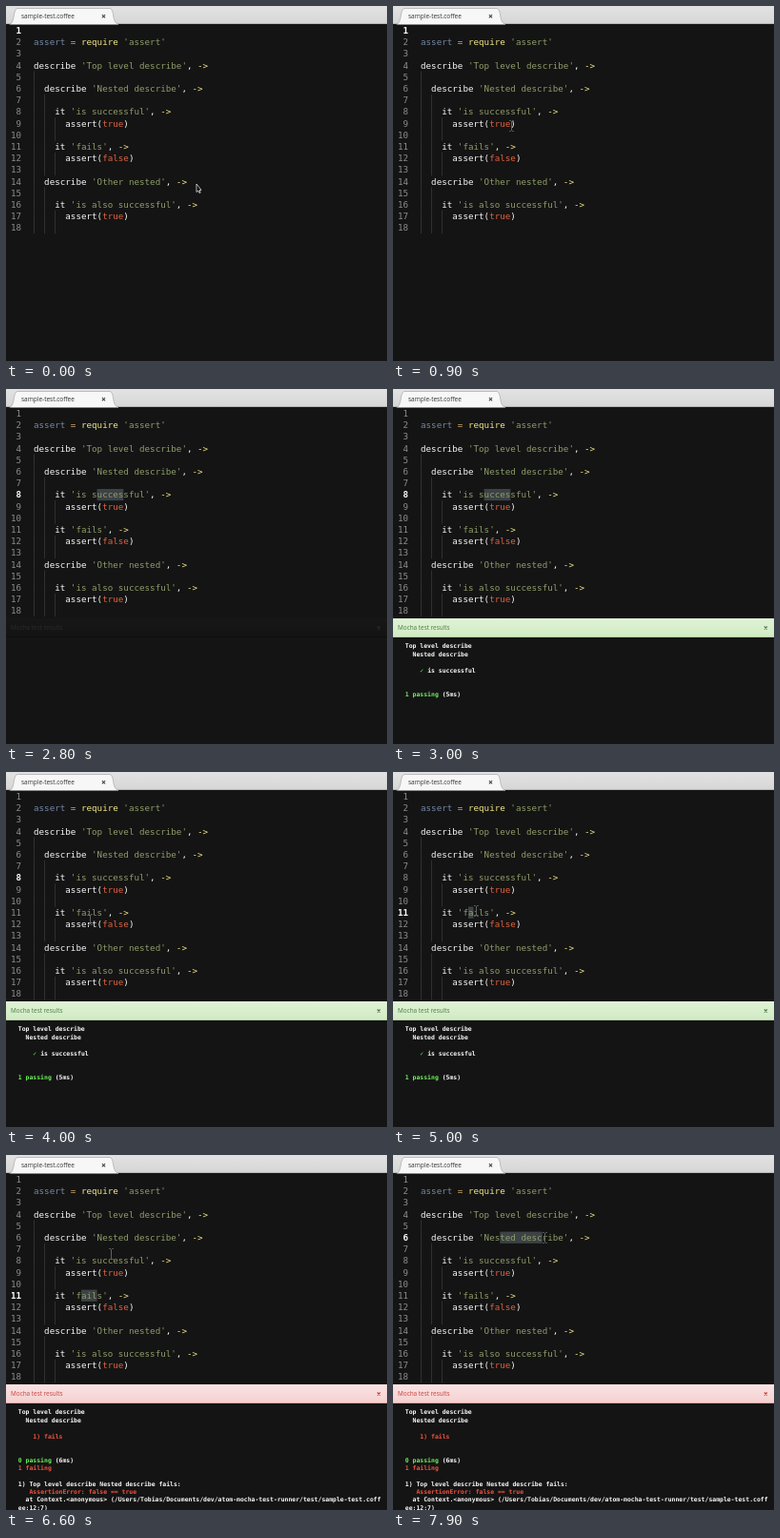
Recreate the animation shown at these times as an HTML page with a canvas. Size 400 px wide and 373 px high, loop 8000 ms.

```html
<!DOCTYPE html>
<html lang="en">
<head>
<meta charset="utf-8">
<title>Mocha test runner</title>
<style>
  html, body { margin: 0; width: 100%; height: 100%; overflow: hidden; background: #141414; }
  canvas { display: block; }
</style>
</head>
<body>
<canvas id="stage" width="400" height="373"></canvas>
<script>
const ctx = document.getElementById('stage').getContext('2d');
const LOOP = 8000, STEP = 100;
const CODE_X = 29, CHAR = 5.55, LINE = 12.2, FIRST = 25.7;
const MONO = '"DejaVu Sans Mono", monospace';
const CODE_FONT = '9.22px ' + MONO;
const OUT_FONT = 'bold 6.46px ' + MONO;
const UI = '"Open Sans", sans-serif';

const C = {
  bg: '#141414', w: '#f8f8f8', s: '#8f9d6a', y: '#f3e888', b: '#7587a6',
  o: '#cda869', r: '#e0623f', green: '#6df05c', red: '#f0523e'
};

// Each line: indent level, then [colour, text] runs
const describe = (level, name) => [level, ['w', 'describe '], ['s', `'${name}'`], ['w', ', '], ['y', '->']];
const it = name => [2, ['w', 'it '], ['s', `'${name}'`], ['w', ', '], ['y', '->']];
const check = value => [3, ['w', 'assert('], ['r', value], ['w', ')']];
const code = [
  null,
  [0, ['b', 'assert'], ['o', ' = '], ['y', 'require '], ['s', "'assert'"]],
  null,
  describe(0, 'Top level describe'),
  null,
  describe(1, 'Nested describe'),
  null,
  it('is successful'),
  check('true'),
  null,
  it('fails'),
  check('false'),
  null,
  describe(1, 'Other nested'),
  null,
  it('is also successful'),
  check('true'),
  null
];

// Each row: row number, column, runs
const head = [
  [0, 0, ['w', 'Top level describe']],
  [1, 2, ['w', 'Nested describe']]
];
const passOut = [
  ...head,
  [3, 4, ['green', '✓ '], ['w', 'is successful']],
  [6, 0, ['green', '1 passing '], ['w', '(5ms)']]
];
const failOut = [
  ...head,
  [3, 4, ['red', '1) fails']],
  [6, 0, ['green', '0 passing '], ['w', '(6ms)']],
  [7, 0, ['red', '1 failing']],
  [9, 0, ['w', '1) Top level describe Nested describe fails:']],
  [10, 3, ['red', 'AssertionError: false == true']],
  [11, 2, ['w', 'at Context.<anonymous> (/Users/Tobias/Documents/dev/atom-mocha-test-runner/test/sample-test.coff']],
  [12, 0, ['w', 'ee:12:7)']]
];

// Panel states by start time
const panels = [
  [0, null],
  [2700, { kind: 'idle', rows: [] }],
  [3000, { kind: 'pass', rows: passOut }],
  [5600, { kind: 'idle', rows: [] }],
  [6000, { kind: 'fail', rows: failOut }]
];
const heads = {
  idle: ['#171717', '#131313', '#2c2c2c', '#0e0e0e'],
  pass: ['#e0f3d6', '#d0eac3', '#4c7d40', '#b4d3a6'],
  fail: ['#fbe3e3', '#f4d0d0', '#c9403c', '#dfaaaa']
};

// Selections: start time, line, first column, drag length limit
const marks = [
  [0, 1, 0, 0],
  [1400, 8, 8, 5],
  [4800, 11, 5, 3],
  [7500, 6, 13, 8]
];

// Pointer: time, x, y; hidden while keys are pressed
const path = [
  [0, 200, 191], [300, 190, 182], [900, 124, 126], [1300, 96, 111], [1400, 96, 111],
  [1800, 120, 111], [1900, 123, 111], [3500, 122, 114], [3800, 106, 175], [4000, 88, 155],
  [4300, 78, 145], [4600, 77.5, 144], [4800, 79, 146], [5200, 95, 146], [6400, 97, 138],
  [6600, 110, 104], [7100, 113, 87], [7500, 113, 87], [7900, 159, 87]
];
const hidden = [[2700, 3500], [5600, 6400]];

const current = (list, t) => list.filter(row => row[0] <= t).pop();

function pointer(t) {
  const i = path.findIndex(p => p[0] > t);
  if (i < 0) return path[path.length - 1].slice(1);
  const [t0, x0, y0] = path[i - 1], [t1, x1, y1] = path[i];
  const k = (t - t0) / (t1 - t0);
  return [x0 + (x1 - x0) * k, y0 + (y1 - y0) * k];
}

function rect(x, y, w, h, color) {
  ctx.fillStyle = color;
  ctx.fillRect(x, y, w, h);
}

function text(str, x, y, font, color, align = 'left') {
  ctx.font = font;
  ctx.fillStyle = color;
  ctx.textAlign = align;
  ctx.fillText(str, x, y);
}

function runs(list, x, y, font, advance) {
  for (const [color, str] of list) {
    text(str, x, y, font, C[color]);
    x += str.length * advance;
  }
}

function shade(y, h, top, bottom) {
  const g = ctx.createLinearGradient(0, y, 0, y + h);
  g.addColorStop(0, top);
  g.addColorStop(1, bottom);
  rect(0, y, 400, h, g);
}

function cross(x, y, r, color) {
  ctx.strokeStyle = color;
  ctx.lineWidth = 1.1;
  ctx.beginPath();
  ctx.moveTo(x - r, y - r);
  ctx.lineTo(x + r, y + r);
  ctx.moveTo(x + r, y - r);
  ctx.lineTo(x - r, y + r);
  ctx.stroke();
}

function tabBar() {
  shade(0, 19, '#e2e2e2', '#d6d6d6');
  rect(0, 18, 400, 1, '#b4b4b4');
  ctx.beginPath();
  ctx.moveTo(4, 19.5);
  ctx.quadraticCurveTo(7, 18, 8, 12);
  ctx.quadraticCurveTo(9, 2.5, 12, 2.5);
  ctx.lineTo(109, 2.5);
  ctx.quadraticCurveTo(112, 2.5, 113, 12);
  ctx.quadraticCurveTo(114, 18, 118, 19.5);
  ctx.fillStyle = '#f7f7f7';
  ctx.fill();
  ctx.strokeStyle = '#b0b0b0';
  ctx.lineWidth = 0.8;
  ctx.stroke();
  text('sample-test.coffee', 16, 13, '6.5px ' + UI, '#333');
  cross(102.5, 10.7, 1.6, '#444');
}

function guides(i) {
  const level = j => code[j] ? code[j][0] : 0;
  const count = code[i] ? level(i) : Math.max(i ? level(i - 1) : 0, i + 1 < code.length ? level(i + 1) : 0);
  for (let g = 0; g < count; g++) {
    rect(Math.round(CODE_X + g * 2 * CHAR), FIRST + (i - 0.5) * LINE, 1, LINE, '#303030');
  }
}

function editor(mark, mx) {
  const [, line, col, limit] = mark;
  if (limit) {
    const x = CODE_X + (code[line - 1][0] * 2 + col) * CHAR;
    const n = Math.max(0, Math.min(limit, Math.round((mx - x) / CHAR)));
    rect(x, FIRST + (line - 1.5) * LINE, n * CHAR, LINE, '#3c4245');
  }
  code.forEach((row, i) => {
    const y = FIRST + i * LINE + 3.2, active = i + 1 === line;
    guides(i);
    text(i + 1, 16, y, (active ? 'bold ' : '') + CODE_FONT, active ? '#fff' : '#8c8c8c', 'right');
    if (row) runs(row.slice(1), CODE_X + row[0] * 2 * CHAR, y, CODE_FONT, CHAR);
  });
}

function panel({ kind, rows }) {
  const [top, bottom, ink, edge] = heads[kind];
  rect(0, 241, 400, 132, C.bg);
  shade(241, 20, top, bottom);
  rect(0, 260, 400, 1, edge);
  text('Mocha test results', 5, 253.3, '6.4px ' + UI, ink);
  cross(391.3, 251, 1.5, ink);
  for (const [row, col, ...list] of rows) {
    runs(list, 12.8 + col * 3.89, 272.4 + row * 8.37, OUT_FONT, 3.89);
  }
}

function arrow(x, y) {
  ctx.beginPath();
  [[0, -4], [0, 4.5], [1.8, 3], [3, 5.5], [4.2, 5], [3, 2.5], [5, 2.3]]
    .forEach(([dx, dy]) => ctx.lineTo(x + dx, y + dy));
  ctx.closePath();
  ctx.fillStyle = '#000';
  ctx.fill();
  ctx.strokeStyle = '#e8e8e8';
  ctx.lineWidth = 0.8;
  ctx.stroke();
}

function beam(x, y) {
  x = Math.round(x);
  y = Math.round(y);
  rect(x, y - 5, 1, 10, '#626262');
  rect(x - 2, y - 6, 2, 1, '#555');
  rect(x + 1, y - 6, 2, 1, '#555');
  rect(x - 2, y + 5, 2, 1, '#555');
  rect(x + 1, y + 5, 2, 1, '#555');
}

function draw(t) {
  const [mx, my] = pointer(t);
  rect(0, 0, 400, 373, C.bg);
  tabBar();
  editor(current(marks, t), mx);
  const state = current(panels, t)[1];
  if (state) panel(state);
  if (t < 100) arrow(mx, my);
  else if (!hidden.some(([a, b]) => t >= a && t < b)) beam(mx, my);
}

function tick() {
  const t = performance.now() % LOOP;
  draw(Math.floor(t / STEP) * STEP);
  requestAnimationFrame(tick);
}
tick();
</script>
</body>
</html>
```
